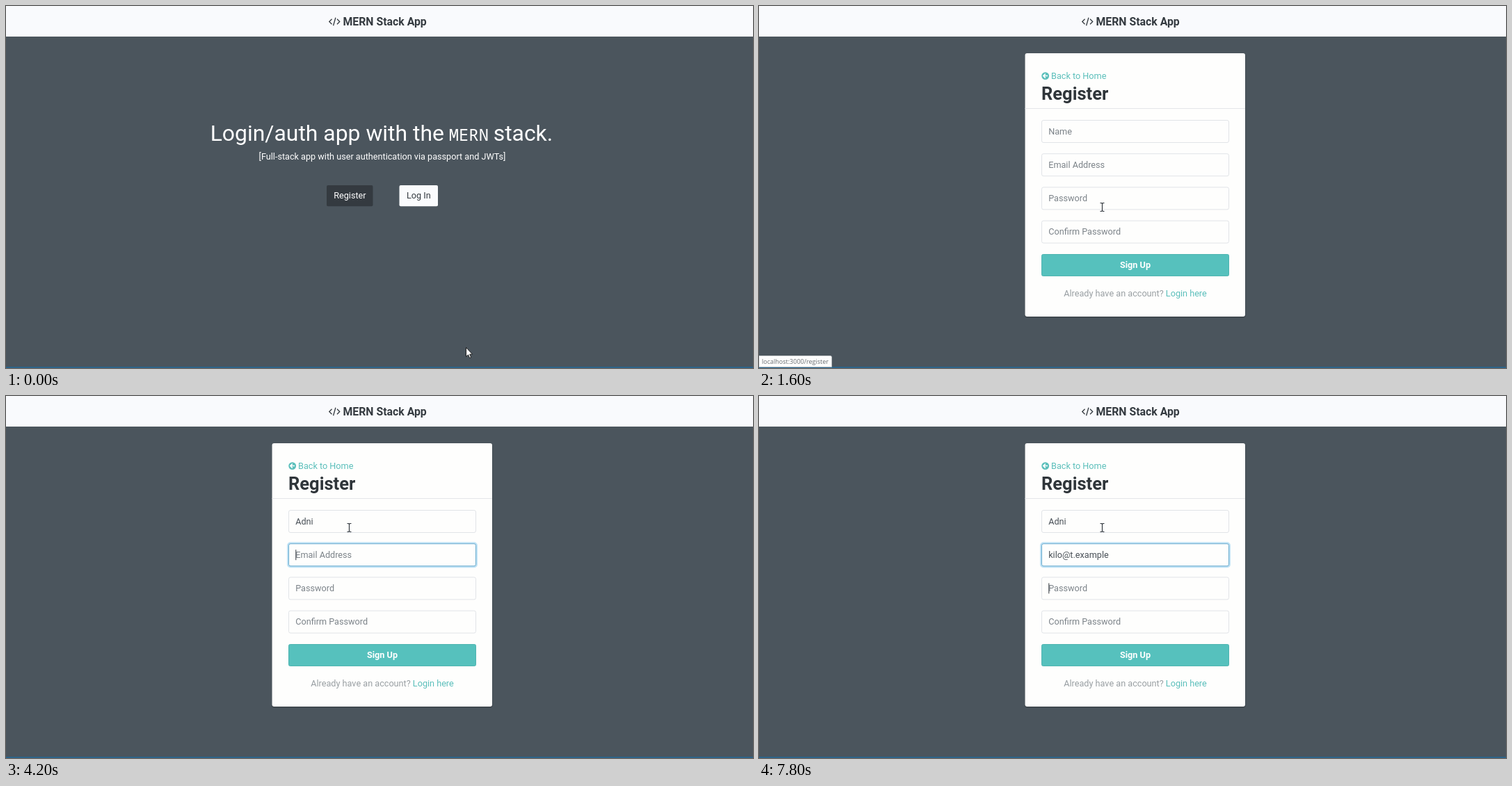
An HTML page that plays this animation: 1074x521 px, repeating every 8000 ms.

```html
<!DOCTYPE html>
<html lang="en">
<head>
<meta charset="utf-8">
<title>MERN Stack App</title>
<style>
html, body { margin: 0; height: 100%; overflow: hidden; background: #4b555d; }
svg { display: block; width: 1074px; height: 521px; font: 12.66px Roboto, sans-serif; }
text { white-space: pre; }
.bold { font-weight: 700; }
.mid { text-anchor: middle; }
.teal { fill: #5bbfbb; }
.field { fill: #fefefd; stroke: #e1e4e8; }
.ring { fill: none; stroke: #c0e2f5; stroke-width: 4; }
.focused .field { stroke: #69abcd; }
.hint { fill: #7c8389; }
.value { fill: #495057; }
.line { fill: none; stroke: #343a40; }
</style>
</head>
<body>
<svg viewBox="0 0 1074 521">
  <rect width="1074" height="521" fill="#4b555d"/>
  <rect width="1074" height="44" fill="#f9fafd"/>
  <rect y="519.3" width="1074" height="1.7" fill="#28658f"/>
  <path class="line" stroke-width="1.3" d="M468.5 18.8L464.8 22.5L468.5 26.2M476 18.8L479.7 22.5L476 26.2M473.9 16.8L470.6 28.2"/>
  <text class="bold" x="484.5" y="28" font-size="15.82" fill="#343a40">MERN Stack App</text>

  <g id="home" fill="#fff">
    <g font-size="31.9">
      <text x="293.7" y="193.5">Login/auth app with the</text>
      <text x="636.8" y="193.5" font-size="23.8" font-family="Noto Sans Mono, monospace">MERN</text>
      <text x="700.7" y="193.5">stack.</text>
    </g>
    <text class="mid" x="541" y="221">[Full-stack app with user authentication via passport and JWTs]</text>
    <rect id="registerButton" x="461" y="258" width="66.5" height="30.3" rx="2"/>
    <text class="mid" x="494.4" y="277">Register</text>
    <rect x="565.5" y="258" width="55.5" height="30.3" rx="2" fill="#fafbfd"/>
    <text class="mid" x="593.3" y="277" fill="#343a40">Log In</text>
  </g>

  <g id="form">
    <rect x="382" y="69" width="317.5" height="379.5" rx="3" fill="#000" opacity=".22"/>
    <rect x="382.5" y="68" width="316.5" height="379" rx="3" fill="#fefefd"/>
    <circle class="teal" cx="411.7" cy="100.6" r="5.4"/>
    <path d="M415 100.6H409M411.8 97.6L408.8 100.6L411.8 103.6" fill="none" stroke="#fff" stroke-width="1.5"/>
    <text class="teal" x="420" y="105">Back to Home</text>
    <text class="bold" x="406" y="134.7" font-size="25.5" fill="#2f353a">Register</text>
    <path d="M382.5 147.5H699" stroke="#e4e6e9"/>
    <g id="fields"></g>
    <rect x="406.5" y="357.5" width="269" height="31" rx="2" fill="#56c1bd" stroke="#4fb5b1"/>
    <text class="bold mid" x="541" y="377" fill="#fff">Sign Up</text>
    <text class="mid" x="541" y="418" fill="#999fa3">Already have an account? <tspan class="teal">Login here</tspan></text>
    <path id="caret" stroke="#343a40"/>
  </g>

  <g id="status">
    <path d="M0 503.5H102.5Q104.5 503.5 104.5 505.5V519.5H0Z" fill="#fdfdfd" stroke="#c4c8cb" stroke-width=".8"/>
    <text x="4" y="515.3" font-size="9" font-family="Open Sans, sans-serif" fill="#6a6e72">localhost:3000/register</text>
  </g>
  <path id="arrow" d="M0 0V13.2L3 10.4L5 15L7.1 14.1L5.2 9.7H9Z" fill="#fff" stroke="#111" stroke-width=".9"/>
  <path id="beam" class="line" stroke-width="1.2" d="M-3 -6H-1L0 -5L1 -6H3M-3 6H-1L0 5L1 6H3M0 -5V5"/>
</svg>
<script>
const LOOP = 8000, PAGE_LOAD = 1600, STATUS_HIDE = 2200;
const CLICK_NAME = 2500, TAB_EMAIL = 4000, TAB_PASSWORD = 7800;
const TEXT_X = 416.2;
const $ = id => document.getElementById(id);
const show = (el, on) => { el.style.display = on ? '' : 'none'; };

const nameKeys = [...'Adni'].map((_, i) => 3200 + 200 * i);
const emailKeys = [...'kilo@t.example'].map((_, i) => (i < 3 ? 4600 : 4800) + 200 * i);

const fields = [
  { hint: 'Name', text: 'Adni', keys: nameKeys },
  { hint: 'Email Address', text: 'kilo@t.example', keys: emailKeys },
  { hint: 'Password', text: '', keys: [] },
  { hint: 'Confirm Password', text: '', keys: [] }
];

$('fields').innerHTML = fields.map((f, i) => {
  const y = 164.5 + 48.2 * i;
  return `<g><rect class="ring" x="406" y="${y - .5}" width="270" height="33" rx="3"/>
    <rect class="field" x="406.5" y="${y}" width="269" height="32" rx="2.5"/>
    <text x="${TEXT_X}" y="${y + 20.2}"></text></g>`;
}).join('');
fields.forEach((f, i) => {
  f.group = $('fields').children[i];
  f.ring = f.group.querySelector('.ring');
  f.label = f.group.querySelector('text');
});

function glide(t, start, end, from, to) {
  const p = Math.min(1, Math.max(0, (t - start) / (end - start)));
  const eased = p * p * (3 - 2 * p);
  return from.map((v, i) => v + (to[i] - v) * eased);
}

function drawFields(t) {
  const ringIndex = t < CLICK_NAME ? -1 : t < TAB_EMAIL ? 0 : 1;
  fields.forEach((f, i) => {
    const typed = f.text.slice(0, f.keys.filter(k => k <= t).length);
    f.label.textContent = typed || f.hint;
    f.label.setAttribute('class', typed ? 'value' : 'hint');
    f.typed = typed;
    f.group.setAttribute('class', i === ringIndex ? 'focused' : '');
    show(f.ring, i === ringIndex);
  });

  // The caret restarts its blink on every key press.
  const active = t >= TAB_PASSWORD ? 2 : ringIndex;
  const events = [CLICK_NAME, TAB_EMAIL, TAB_PASSWORD, ...nameKeys, ...emailKeys];
  const last = Math.max(...events.filter(e => e <= t));
  const visible = active >= 0 && (t - last) % 1000 < 500;
  show($('caret'), visible);
  if (visible) {
    const f = fields[active];
    const x = TEXT_X + .6 + (f.typed ? f.label.getComputedTextLength() : 0);
    $('caret').setAttribute('d', `M${x} ${173 + 48.2 * active}v15`);
  }
}

function draw(t) {
  const onForm = t >= PAGE_LOAD;
  const [x, y] = onForm
    ? glide(t, 1800, 2400, [493.5, 289.5], [493.5, 189.5])
    : glide(t, 150, 1300, [661.5, 491.5], [485.5, 275.5]);
  const hover = !onForm && x > 461 && x < 527.5 && y > 258 && y < 288;

  show($('home'), !onForm);
  show($('form'), onForm);
  show($('arrow'), !onForm);
  show($('beam'), onForm);
  show($('status'), hover || onForm && t < STATUS_HIDE);
  $('registerButton').setAttribute('fill', hover ? '#1d2124' : '#343a40');
  $(onForm ? 'beam' : 'arrow').setAttribute('transform', `translate(${x} ${y})`);
  if (onForm) drawFields(t);
}

function tick() {
  draw(performance.now() % LOOP);
  requestAnimationFrame(tick);
}
tick();
</script>
</body>
</html>
```
